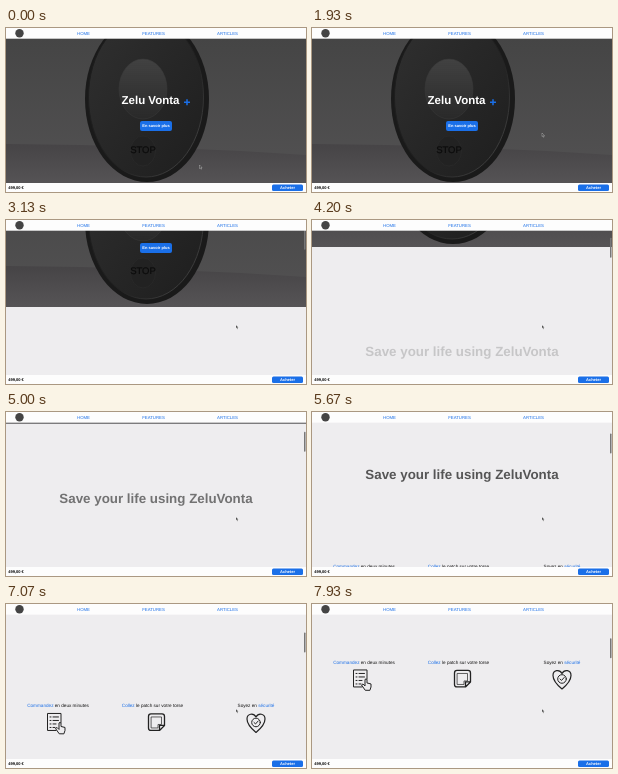
Recreate the animation shown at these times as an HTML page. Size 300 by 164 pixels, loop 8000 ms.

```html
<!DOCTYPE html>
<html lang="fr">
<head>
<meta charset="utf-8">
<title>Page produit</title>
<style>
  html, body { margin: 0; width: 100%; height: 100%; overflow: hidden; background: #eeedef; }
  svg { display: block; width: 100vw; height: 100vh; }
  text { font-family: "Liberation Sans", Arial, sans-serif; text-anchor: middle; text-rendering: geometricPrecision; }
  .bold { font-weight: bold; }
  .blue { fill: #1a6fe8; }
  .nav { font-size: 4.3px; }
  .small { font-size: 4px; font-weight: bold; }
  .feature { font-size: 4.65px; fill: #111; }
  .icon { fill: none; stroke: #222; stroke-width: 1; stroke-linejoin: round; stroke-linecap: round; }
</style>
</head>
<body>
<svg viewBox="0 0 300 164" preserveAspectRatio="none">
  <defs>
    <linearGradient id="wall" x2="0" y2="1">
      <stop stop-color="#444"/><stop offset="1" stop-color="#535253"/>
    </linearGradient>
    <linearGradient id="floor" x2="0" y2="1">
      <stop stop-color="#464446"/><stop offset="1" stop-color="#565456"/>
    </linearGradient>
    <linearGradient id="disc" x2="1" y2="1">
      <stop stop-color="#303030"/><stop offset=".55" stop-color="#262626"/><stop offset="1" stop-color="#1e1e1e"/>
    </linearGradient>
    <linearGradient id="rim" x2="1" y2="1">
      <stop stop-color="#1b1b1b"/><stop offset=".6" stop-color="#222"/><stop offset="1" stop-color="#4c4c4c"/>
    </linearGradient>
    <linearGradient id="grille" x2="0" y2="1">
      <stop stop-color="#464646"/><stop offset="1" stop-color="#282828"/>
    </linearGradient>
    <pattern id="holes" width="2" height="2" patternUnits="userSpaceOnUse">
      <circle cx="1" cy="1" r=".5" fill="#2c2c2c"/>
    </pattern>
  </defs>

  <g id="page">
    <rect width="300" height="157" fill="url(#wall)"/>
    <path d="M0 116Q150 117 300 127V157H0z" fill="url(#floor)"/>
    <ellipse cx="141" cy="71" rx="62" ry="83" fill="#1a1a1a"/>
    <ellipse cx="140" cy="69" rx="57.5" ry="80" fill="url(#disc)" stroke="url(#rim)"/>
    <ellipse cx="137" cy="61" rx="24" ry="30" fill="url(#grille)"/>
    <ellipse cx="137" cy="61" rx="24" ry="30" fill="url(#holes)" stroke="#3a3a3a" stroke-width=".5"/>
    <ellipse cx="137" cy="123" rx="12.5" ry="15" fill="#222" stroke="#2e2e2e" stroke-width=".5"/>
    <text x="137" y="124.5" font-size="9.5" fill="#0c0c0c" stroke="#0c0c0c" stroke-width=".2">STOP</text>
    <text class="bold" x="144.500" y="76.200" font-size="11.500" fill="#fff">Zelu Vonta</text>
    <path d="M178 74.300h6M181 71.300v6" stroke="#1a6fe8" stroke-width="1.500"/>
    <rect x="134" y="93" width="32" height="10" rx="2" fill="#1a6fe8"/>
    <text class="small" x="150" y="99.400" fill="#fff">En savoir plus</text>

    <text id="heading" class="bold" x="150" font-size="13.350" fill="#2d2d2d">Save your life using ZeluVonta</text>

    <g transform="translate(0 314)">
      <text class="feature" x="52" y="1.7"><tspan class="blue">Commandez</tspan> en deux minutes</text>
      <text class="feature" x="146.5" y="1.7"><tspan class="blue">Collez</tspan> le patch sur votre torse</text>
      <text class="feature" x="250" y="1.7">Soyez en <tspan class="blue">sécurité</tspan></text>
      <g class="icon">
        <path d="M50 25h-8.5V8h13.500v9M44 11.500h1M47 11.500h5.500M44 15h1M47 15h5.500M44 18.500h1M47 18.500h3M44 22h1M47 22h2"/>
        <path d="M53 28l-3.500-5 1.500-1 2 2v-6.500q1-1 2 0v3.500l4 1v3l-1 3z" fill="#eeedef"/>
        <path d="M145 8.500h11q2.500 0 2.500 2.500v9l-5 5h-8.500q-2.500 0-2.500-2.500v-11.500q0-2.500 2.500-2.500zM158 20h-4.500v4.500" stroke-width="1.3"/>
        <path d="M145.500 11.500h10v7.500h-3.500v3.500h-6.500z" stroke-width=".7"/>
        <path d="M250 27C244 22 241 18 241 13.500C241 8 247.500 7 250 11.500C252.500 7 259 8 259 13.500C259 18 256 22 250 27z" stroke-width="1.200"/>
        <circle cx="250" cy="17" r="4.300"/><path d="M248 17l1.500 1.500 2.700-3"/>
      </g>
    </g>
  </g>

  <rect id="thumb" x="298" width="1.500" height="20" rx=".7" fill="#777"/>
  <rect width="300" height="10.700" fill="#fdfdfd"/>
  <circle cx="13.500" cy="5.300" r="4.200" fill="#444"/>
  <g class="nav blue">
    <text x="77.500" y="7">HOME</text>
    <text x="147.500" y="7">FEATURES</text>
    <text x="221.500" y="7">ARTICLES</text>
  </g>
  <rect y="155" width="300" height="9" fill="#fdfdfd"/>
  <text class="small" x="10" y="161.200">499,00 €</text>
  <rect x="266" y="156.500" width="31" height="6.500" rx="1.500" fill="#1a6fe8"/>
  <text class="small" x="281.500" y="161.200" fill="#fff">Acheter</text>
  <path id="cursor" d="M0 0v3.500l.8-.7.7 1.500.6-.3-.7-1.400h1.100z" fill="#333" stroke="#fff" stroke-width=".3"/>
</svg>
<script>
  const LOOP = 8000;
  const byId = id => document.getElementById(id);
  const page = byId("page"), heading = byId("heading"), thumb = byId("thumb"), cursor = byId("cursor");

  // Keys are [time in ms, value].
  const scrollKeys = [[2000, 0], [3130, 70], [4200, 130], [5000, 145.5], [6270, 172], [7930, 256], [8000, 259]];
  const revealKeys = [[3900, 0], [4200, .2], [5000, .64], [6270, .92], [7500, 1]];
  const cursorKeys = [[0, 0], [330, .1], [870, .1], [1730, 1]];

  function valueAt(keys, t) {
    if (t <= keys[0][0]) return keys[0][1];
    for (let i = 1; i < keys.length; i++) {
      const [t0, a] = keys[i - 1], [t1, b] = keys[i];
      if (t <= t1) return a + (b - a) * (t - t0) / (t1 - t0);
    }
    return keys[keys.length - 1][1];
  }

  function draw(t) {
    const scroll = valueAt(scrollKeys, t);
    const reveal = valueAt(revealKeys, t);
    const travel = valueAt(cursorKeys, t);
    page.setAttribute("transform", `translate(0 ${-scroll})`);
    heading.setAttribute("y", 212.3 + 67 * (1 - reveal));
    heading.setAttribute("opacity", reveal);
    thumb.setAttribute("y", .5 + .132 * scroll);
    thumb.setAttribute("opacity", scroll > 0 ? 1 : 0);
    cursor.setAttribute("transform", `translate(${193.5 + 36.5 * travel} ${137 - 32 * travel})`);
  }

  const start = performance.now();
  function tick() {
    draw((performance.now() - start) % LOOP);
    requestAnimationFrame(tick);
  }
  draw(0);
  requestAnimationFrame(tick);
</script>
</body>
</html>
```
